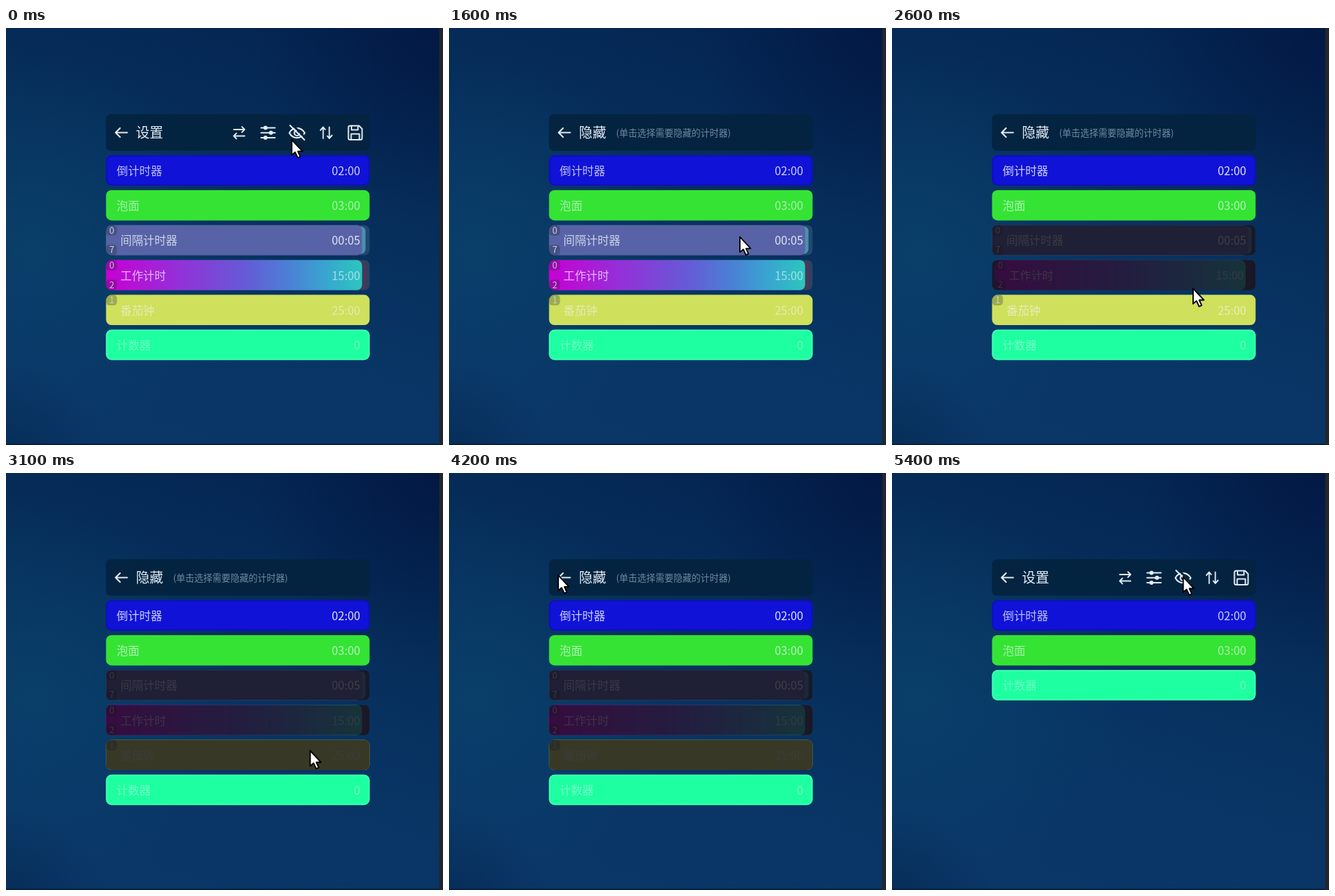
An HTML page that plays this animation: 640 px wide and 612 px high, repeating every 5.5 s.

```html
<!DOCTYPE html>
<html lang="zh-CN">
<head>
<meta charset="utf-8">
<style>
html, body { margin: 0; width: 100%; height: 100%; overflow: hidden; background: #07305d; }
svg { display: block; width: 640px; height: 612px; }
text { font-family: "Noto Sans CJK SC", "Noto Sans CJK", "Noto Sans", sans-serif; }
.icon { fill: none; stroke: #e3edf4; stroke-width: 2.2; stroke-linecap: round; stroke-linejoin: round; }
</style>
</head>
<body>
<svg viewBox="0 0 640 612" xmlns="http://www.w3.org/2000/svg">
  <defs>
    <linearGradient id="sky" gradientUnits="userSpaceOnUse" x1="480" y1="-60" x2="260" y2="600">
      <stop offset="0" stop-color="#042350"/>
      <stop offset=".35" stop-color="#062c59"/>
      <stop offset=".7" stop-color="#083564"/>
      <stop offset="1" stop-color="#0a3668"/>
    </linearGradient>
    <radialGradient id="glow" gradientUnits="userSpaceOnUse" cx="40" cy="330" r="300">
      <stop offset="0" stop-color="#0a446c" stop-opacity=".65"/>
      <stop offset="1" stop-color="#0a446c" stop-opacity="0"/>
    </radialGradient>
    <radialGradient id="shade" gradientUnits="userSpaceOnUse" cx="640" cy="0" r="280">
      <stop offset="0" stop-color="#021540" stop-opacity=".75"/>
      <stop offset="1" stop-color="#021540" stop-opacity="0"/>
    </radialGradient>
    <radialGradient id="corner" gradientUnits="userSpaceOnUse" cx="0" cy="640" r="150">
      <stop offset="0" stop-color="#052850" stop-opacity=".7"/>
      <stop offset="1" stop-color="#052850" stop-opacity="0"/>
    </radialGradient>
    <linearGradient id="work">
      <stop offset="0" stop-color="#c800d4"/>
      <stop offset=".28" stop-color="#9430d8"/>
      <stop offset=".55" stop-color="#645cd6"/>
      <stop offset=".72" stop-color="#4a82d6"/>
      <stop offset=".86" stop-color="#38a6d0"/>
      <stop offset="1" stop-color="#2cc6be"/>
    </linearGradient>
  </defs>
  <rect width="640" height="612" fill="url(#sky)"/>
  <rect width="640" height="612" fill="url(#glow)"/>
  <rect width="640" height="612" fill="url(#shade)"/>
  <rect width="640" height="612" fill="url(#corner)"/>
  <rect y="610" width="640" height="2" fill="#04213f"/>
  <rect x="634.5" width="5.5" height="612" fill="#23262d"/>

  <rect x="146.500" y="126.500" width="386" height="53.5" rx="7" fill="#04233f" fill-opacity=".92"/>
  <path class="icon" d="M177.500 153.500H160.500M167 147l-6.500 6.500 6.500 6.500"/>
  <text id="title" x="190.300" y="161.300" font-size="20" fill="#e3edf4"></text>
  <text id="hint" x="244.700" y="158.600" font-size="13.250" fill="#7189a0">(单击选择需要隐藏的计时器)</text>
  <g id="tools" class="icon">
    <path stroke-width="1.800" d="M333.500 149H349.500M345.500 145l4 4-4 4M349.500 158.500H333.500M337.500 154.500l-4 4 4 4"/>
    <path stroke-width="2" d="M373.500 146.500H394M373.500 153.800H394M373.500 161H394"/>
    <g fill="#e3edf4" stroke="none">
      <circle cx="380" cy="146.500" r="3"/><circle cx="388" cy="153.800" r="3"/><circle cx="380" cy="161" r="3"/>
    </g>
    <path d="M415 154C420 144.500 432 144.500 437.500 154C432 163.500 420 163.500 415 154Z"/>
    <circle cx="426.300" cy="154" r="4"/>
    <path stroke="#04233f" stroke-width="3" d="M419 141.500L439 161.500"/>
    <path d="M416 143L437 164"/>
    <path stroke-width="1.900" d="M464.500 162V145.500M460.500 150l4-4.500 3 3.500M473.500 145.500V162M470.500 158.500l3 3.500 4-4.500"/>
    <path stroke-width="2" d="M504 143.500H517l4.500 4.500V161.500a2.500 2.500 0 0 1-2.500 2.500H504a2.500 2.500 0 0 1-2.500-2.500V146a2.500 2.500 0 0 1 2.500-2.500ZM506 144V149.500H515.500V144M505.500 163.500V155.500H517.500V163.500"/>
  </g>
  <g id="list"></g>
  <path id="cursor" d="M0 0V22.500L5 18.300L8.800 26.500L12.500 24.900L9 17H15.800Z" fill="#fff" stroke="#000" stroke-width="1.900" stroke-linejoin="round"/>
</svg>
<script>
const $ = id => document.getElementById(id);
const LOOP = 5500, LEFT = 146.5, WIDTH = 386, HEIGHT = 44.4, TOP = 186.8, PITCH = 51.2;
const OPEN = 1100, CLOSE = 4400;

// ink and late: opacity of the name and of the time
const rows = [
  { name: '倒计时器', time: '02:00', fill: '#1012d8', edge: '#0e0fc0', ink: .76, late: .84 },
  { name: '泡面', time: '03:00', fill: '#35e334', ink: .58, late: .62 },
  { name: '间隔计时器', time: '00:05', fill: '#5763a6', width: 375, tip: '#4a91ae',
    base: '#24476d', badges: ['0', '7'], ink: .76, late: .88, click: 2000 },
  { name: '工作计时', time: '15:00', fill: 'url(#work)', width: 375, base: '#2c4263', mark: '#8c2038',
    badges: ['0', '2'], ink: .72, late: .6, click: 2450 },
  { name: '番茄钟', time: '25:00', fill: '#cfe05c', badges: ['1'], ink: .52, late: .52, click: 2850 },
  { name: '计数器', time: '0', fill: '#1dffa0', edge: '#3fffb2', ink: .38, late: .4 }
];

const box = (x, y, w, h, rx, fill, more = '') =>
  `<rect x="${x}" y="${y}" width="${w}" height="${h}" rx="${rx}" fill="${fill}" ${more}/>`;
const label = (x, y, size, str, alpha, anchor = 'start') =>
  `<text x="${x}" y="${y}" font-size="${size}" fill="#f4f8ff" fill-opacity="${alpha}" text-anchor="${anchor}">${str}</text>`;

function rowMarkup(row) {
  const w = row.width || WIDTH;
  let bar = '';
  if (row.tip) bar += box(340, 2, 40, HEIGHT - 4, 7, row.tip);
  if (row.mark) bar += box(350, 2.5, 29, HEIGHT - 5, 7, 'none', `stroke="${row.mark}" stroke-width="1.5"`);
  bar += box(0, 0, w, HEIGHT, 8, row.fill);
  if (row.edge) bar += box(1, 1, w - 2, HEIGHT - 2, 7, 'none', `stroke="${row.edge}" stroke-width="2"`);
  (row.badges || []).forEach((str, i) => {
    const y = i ? HEIGHT - 15.5 : 0;
    bar += box(0, y, 16, 15.5, 5, '#1c2430', 'fill-opacity=".28"');
    bar += label(8.5, y + 12.4, 13.3, str, row.ink, 'middle');
  });
  bar += label(row.badges ? 21 : 15.5, 29.2, 16.7, row.name, row.ink);
  bar += label(372.3, 29.2, 16.7, row.time, row.late, 'end');
  const base = row.base ? box(0, 0, WIDTH, HEIGHT, 8, row.base) : '';
  const veil = box(0, 0, WIDTH, HEIGHT, 8, '#12101a', 'class="veil"');
  return `<g class="row">${base}<g class="bar">${bar}</g>${veil}</g>`;
}

$('list').innerHTML = rows.map(rowMarkup).join('');
[...document.querySelectorAll('.row')].forEach((el, i) => {
  rows[i].el = el;
  rows[i].bar = el.querySelector('.bar');
  rows[i].veil = el.querySelector('.veil');
  rows[i].texts = el.querySelectorAll('text');
});

// time, x, y
const path = [
  [0, 418.5, 164], [100, 418.5, 164], [700, 430.5, 152.5], [1100, 430.5, 152.5],
  [1550, 426, 306.5], [2000, 427, 309], [2400, 436.5, 357], [2800, 445.5, 407.5],
  [3400, 445.5, 407.5], [4100, 160, 150], [4500, 160, 150], [5200, 426.5, 152.5], [5500, 426.5, 152.5]
];

const clamp = v => Math.max(0, Math.min(1, v));
const mix = (a, b, k) => a + (b - a) * k;
const ease = k => k * k * (3 - 2 * k);

function cursorAt(t) {
  const i = path.findIndex(p => p[0] > t);
  const a = path[i - 1], b = path[i];
  const k = ease((t - a[0]) / (b[0] - a[0]));
  return [mix(a[1], b[1], k), mix(a[2], b[2], k)];
}

function pressScale(t, click) {
  const down = clamp((t - click + 60) / 80) * clamp((click + 230 - t) / 80);
  return 1 - .02 * down;
}

function draw(t) {
  const picking = t >= OPEN && t < CLOSE;
  $('title').textContent = picking ? '隐藏' : '设置';
  $('hint').style.display = picking ? '' : 'none';
  $('tools').style.display = picking ? 'none' : '';

  let slot = 0;
  for (const row of rows) {
    const gone = row.click && t >= CLOSE;
    row.el.style.display = gone ? 'none' : '';
    if (gone) continue;
    row.el.setAttribute('transform', `translate(${LEFT} ${TOP + PITCH * slot++})`);
    row.veil.setAttribute('opacity', row.click ? .8 * clamp((t - row.click) / 120) : 0);
    const s = row.click ? pressScale(t, row.click) : 1;
    const cx = WIDTH / 2, cy = HEIGHT / 2;
    row.bar.setAttribute('transform', `translate(${cx} ${cy}) scale(${s}) translate(${-cx} ${-cy})`);
    const lift = t >= 2500 && t < CLOSE ? 1.1 : 1;
    row.texts.forEach(el => el.setAttribute('opacity', lift));
    row.texts.forEach((el, i) => {
      const alpha = i === row.texts.length - 1 ? row.late : row.ink;
      el.setAttribute('fill-opacity', Math.min(1, alpha * lift));
    });
  }
  $('cursor').setAttribute('transform', `translate(${cursorAt(t)})`);
}

const start = performance.now();
function tick() {
  const t = (performance.now() - start) % LOOP;
  draw(Math.floor(t / 100) * 100);
  requestAnimationFrame(tick);
}
tick();
</script>
</body>
</html>
```
